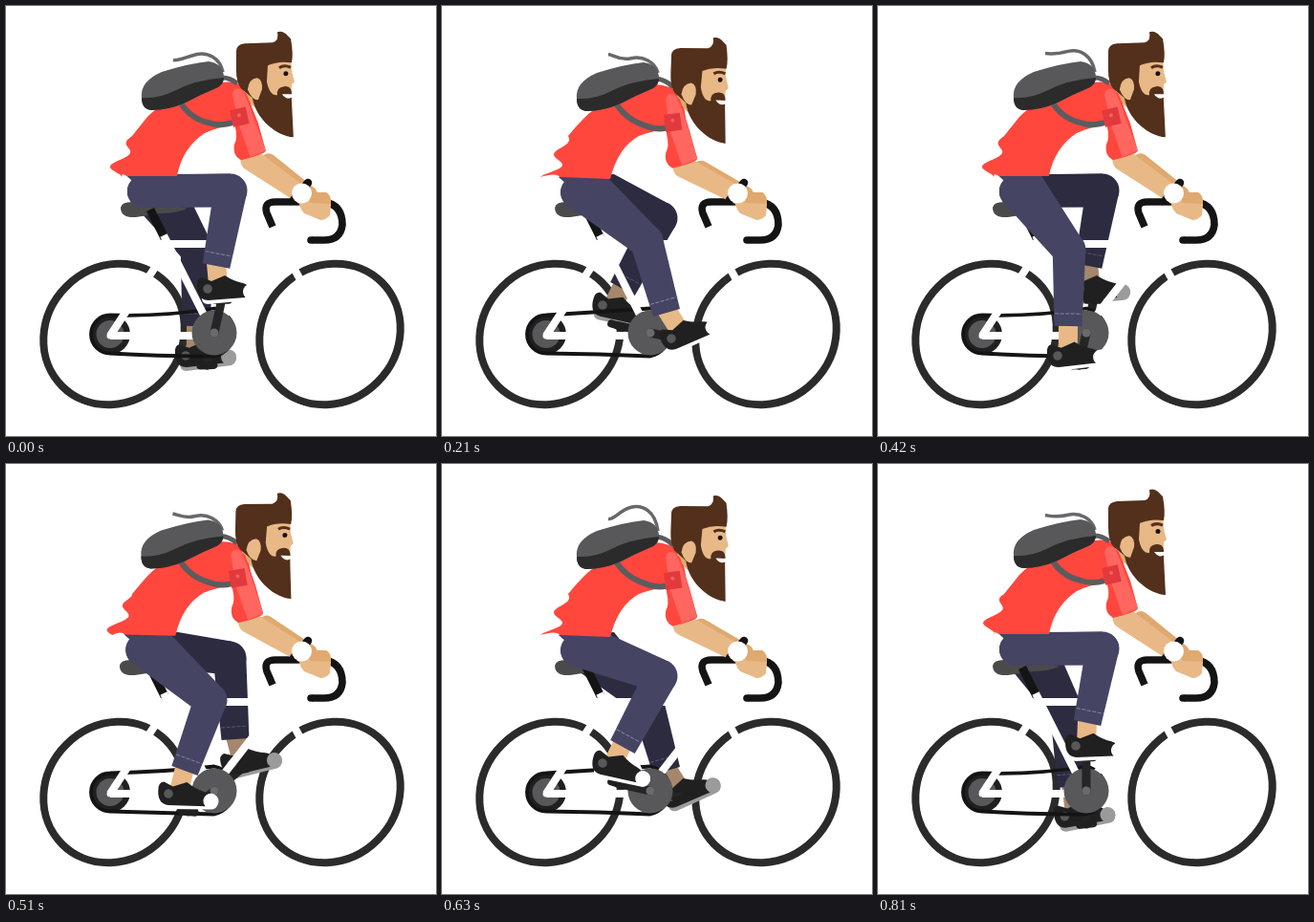
Write an HTML page with a canvas that moves like this. It is 450 px wide and 450 px high and loops after 840 ms.

```html
<!DOCTYPE html>
<html lang="en">
<head>
<meta charset="utf-8">
<title>Cyclist</title>
<style>
  html, body { margin: 0; width: 100%; height: 100%; overflow: hidden; background: #fff; }
  canvas { display: block; width: 450px; height: 450px; }
</style>
</head>
<body>
<canvas id="stage" width="450" height="450"></canvas>
<script>
const ctx = document.getElementById('stage').getContext('2d');
const LOOP = 840, STEP = 30, TAU = Math.PI * 2;
const C = {
  tyre: '#2b2b2b', black: '#141414', shoe: '#202020', white: '#fff', red: '#ff473e',
  band: '#ff6660', badge: '#e2393d', skin: '#e8b987', tan: '#dfa96f', hair: '#53301c',
  bag: '#2b2b2b', grey: '#58585a', strap: '#5c5c5e'
};
const NEAR = { cloth: '#454463', skin: C.skin, sole: C.white, seam: '#8584a0', waist: 170 };
const FAR = { cloth: '#2c2b40', skin: '#a5876c', sole: '#9b9b9b', seam: '#55546c', waist: 180 };
const BB = [218, 342], COG = [109, 343.5];

// time, knee x y, cuff x y, heel x y, foot angle
const PEDAL = [
  [0, 235, 193, 220, 272, 211, 296, 0],
  [90, 234, 203, 240, 288, 236, 314, -9],
  [120, 232, 211, 244, 296, 240, 321, -13],
  [210, 214, 246, 235, 321, 240, 348, -19],
  [330, 197, 262, 209, 339, 211, 368, -14],
  [420, 200, 255, 199, 335, 188, 366, -2],
  [510, 214, 247, 187, 321, 170, 345, 6],
  [630, 229, 222, 189, 296, 168, 313, 17],
  [750, 235, 197, 211, 275, 196, 297, 8],
  [810, 235, 193, 219, 271, 207, 295, 2]
];

function pose(t) {
  const n = PEDAL.length;
  const row = i => {
    const k = (i + n) % n, turn = Math.floor(i / n) * LOOP;
    return PEDAL[k].map((v, c) => c ? v : v + turn);
  };
  t = ((t % LOOP) + LOOP) % LOOP;
  let i = n - 1;
  while (PEDAL[i][0] > t) i--;
  const [a, b, c, d] = [-1, 0, 1, 2].map(k => row(i + k));
  const span = c[0] - b[0], s = (t - b[0]) / span;
  return b.slice(1).map((p, k) => {
    k++;
    const m0 = (c[k] - a[k]) / (c[0] - a[0]) * span;
    const m1 = (d[k] - b[k]) / (d[0] - b[0]) * span;
    return (2 * s ** 3 - 3 * s * s + 1) * p + (s ** 3 - 2 * s * s + s) * m0 +
      (3 * s * s - 2 * s ** 3) * c[k] + (s ** 3 - s * s) * m1;
  });
}

function fill(d, color) {
  ctx.fillStyle = color;
  ctx.fill(new Path2D(d));
}
function stroke(d, color, w, cap = 'butt') {
  ctx.strokeStyle = color;
  ctx.lineWidth = w;
  ctx.lineCap = cap;
  ctx.lineJoin = 'round';
  ctx.stroke(new Path2D(d));
}
function disc(x, y, r, color) {
  ctx.fillStyle = color;
  ctx.beginPath();
  ctx.arc(x, y, r, 0, TAU);
  ctx.fill();
}
function poly(color, ...pts) {
  fill('M' + pts.map(p => p.join(' ')).join('L') + 'Z', color);
}
function at(x, y, deg, draw) {
  ctx.save();
  ctx.translate(x, y);
  ctx.rotate(deg * Math.PI / 180);
  draw();
  ctx.restore();
}
// Tapered limb with round ends
function limb(x1, y1, r1, x2, y2, r2, color) {
  const a = Math.atan2(y2 - y1, x2 - x1);
  const o = Math.acos((r1 - r2) / Math.hypot(x2 - x1, y2 - y1));
  ctx.fillStyle = color;
  ctx.beginPath();
  ctx.arc(x1, y1, r1, a + o, a - o + TAU);
  ctx.arc(x2, y2, r2, a - o, a + o);
  ctx.fill();
}

// The wheels are slightly oval, leaning to the right
function wheel(x, y) {
  ctx.strokeStyle = C.tyre;
  ctx.lineWidth = 8;
  ctx.beginPath();
  ctx.ellipse(x, y, 76.8, 70.6, -Math.PI / 4, 0, TAU);
  ctx.stroke();
}

function crank(angle, foot) {
  const x = BB[0] + 35 * Math.sin(angle), y = BB[1] - 35 * Math.cos(angle);
  stroke(`M${BB[0]} ${BB[1]}L${x} ${y}`, '#252525', 9, 'round');
  at(x, y, foot, () => stroke('M-7 0H7', C.shoe, 8, 'round'));
}

function leg([kx, ky, cx, cy, hx, hy, tilt], b, k) {
  const hip = [144 - 3 * b, 194 + b];
  const d = Math.hypot(kx - hip[0], ky - hip[1]);
  const nx = (ky - hip[1]) / d, ny = (hip[0] - kx) / d;
  const rad = tilt * Math.PI / 180, co = Math.cos(rad), si = Math.sin(rad);
  const ax = hx + 11 * co + 5 * si, ay = hy + 11 * si - 5 * co;
  stroke(`M${cx} ${cy - 3}L${ax} ${ay}`, k.skin, 20);
  at(hx, hy, tilt, () => {
    fill('M-6 8L44-4Q53-3 53 4Q52 12 44 12L0 16Q-7 15-6 8Z', k.sole);
    fill('M-11-2Q-12-11-6-12L4-8L18-14Q27-8 37-6Q44-4 44 2L40 9L1 12Q-10 12-11-2Z', C.shoe);
    disc(45, 3, 8, k.sole);
    disc(0, 0, 4.8, C.grey);
  });
  limb(...hip, 17, kx, ky, 17.5, k.cloth);
  poly(k.cloth, [126 - 4 * b, 177 + 2 * b], [k.waist, 176], [kx + nx * 17.5, ky + ny * 17.5], [kx, ky], hip);
  const a = Math.atan2(cy - ky, cx - kx) * 180 / Math.PI - 90, len = Math.hypot(cx - kx, cy - ky);
  at(kx, ky, a, () => {
    poly(k.cloth, [-17.3, 0], [17.3, 0], [14.5, len], [-14.5, len]);
    ctx.setLineDash([4, 1.5]);
    stroke(`M-14 ${len - 13}H14`, k.seam, 1);
    ctx.setLineDash([]);
  });
}

function chain(b) {
  const sag = 3 * (1 - b);
  disc(...COG, 21, C.shoe);
  disc(...COG, 14.5, C.grey);
  stroke(`M109 323.5Q165 ${320 + sag * 1.8} ${BB[0]} 316.5A25.5 25.5 0 0 1 ${BB[0]} 366.5
    Q165 ${364 + sag} 109 363.5A20 20 0 0 1 109 323.5`, C.black, 3.8);
}

function bike(b) {
  at(-2 * b, 0, 0, () =>
    fill('M120 211Q121 205 132 205L166 206L190 212Q178 217 162 217L136 221Q120 222 120 211Z', '#4a4a4b'));
  stroke('M151 213L166 243', C.black, 9);
  stroke('M109 345L172 249H286M165 240L218 345M212 345L286 250M109 345H212M339 344L299 270', C.white, 8);
  disc(109, 345, 3.5, C.white);
  disc(...BB, 23.5, C.grey);
}

function shirt(b, u) {
  const tail = [];
  for (let i = 0; i <= 18; i++) {
    const s = i / 18;
    const w = Math.cos(TAU * ((s - .1) / .62 - u));
    tail.push(`${132 - 20 * s - 10 * Math.sqrt(s) * w} ${136 + 43 * s}`);
  }
  const x = -3 * b, y = 6 * b;
  fill(`M${254 + x} ${87 + y}Q${240 + x} ${76 + y} 222 ${81 + b}Q165 ${97 + 2 * b} 148 ${116 + 2 * b}
    Q140 126 132 136L${tail.join('L')}Q120 174 ${127 - 4 * b} ${178 + b}L${179 - 3 * b} ${178 + 3 * b}
    Q${185 - b} 148 ${208 - 2 * b} ${133 + 3 * b}Q222 ${126 + 4 * b} ${241 + x} ${124 + y}L${258 + x} ${112 + y}Z`, C.red);
}

function bag(b, t) {
  const flap = shift => Math.cos(TAU * (t - shift) / (LOOP / 3));
  const end = 53 + 5 * flap(35), mid = 49 - 5 * flap(85);
  stroke(`M${181 - b} ${98 + b}Q191 ${117 + b} 212 ${122 + 3 * b}Q224 ${126 + 4 * b} ${237 - 3 * b} ${122 + 6 * b}`, C.strap, 6);
  stroke(`M224 ${75 + b}Q234 ${74 + 3 * b} 242 ${81 + 4 * b}`, C.strap, 5);
  at(-b, b, 0, () => {
    stroke(`M227 69C224 ${mid + 4} 211 ${mid - 3} 199 ${mid}S181 ${end + 1} 175 ${end}`, '#68686a', 3.5);
    const base = 'Q228 81 222 85Q205 92 188 101Q170 109 152 109Q142 108 142 96';
    fill(`M142 96Q140 79 163 69Q192 60 212 58Q227 60 228 74${base}Z`, C.grey);
    fill(`M142 96Q160 97 176 89Q199 77 228 75${base}Z`, C.bag);
  });
}

function head(b) {
  at(270 - 1.5 * b, 60 + 6 * b, 2.2 * b, () => {
    ctx.translate(-270, -60);
    fill('M247 78L270 78L269 112Q256 104 249 92Z', C.tan);
    fill('M262 52H298L299 68L302 79L299 82V100H266Z', C.skin);
    fill(`M241 47Q241 40 250 39L279 38Q286 36 284 27Q290 25 295 31L298 34Q301 50 299 59
      Q285 57 274 62L273 79Q276 94 284 93Q283 85 291 84Q298 83 299 90L299 98L301 137
      C284 136 262 119 258 96L246 86Q241 80 241 66Z`, C.hair);
    fill('M253 87Q254 76 263 75Q269 77 268 87L264 98Q257 98 253 87Z', C.skin);
    fill('M289 92H300V95Q294 99 289 92Z', C.white);
    stroke('M286 64.5Q291 61 298 64', C.hair, 3);
    disc(293, 70.5, 2.5, '#1c1412');
  });
}

function arm(b) {
  const ex = 257 - 4 * b, ey = 161 + 8 * b;
  stroke('M279 231L273 217Q269 205 282 205H333Q352 208 352 229Q350 245 333 245H320', C.black, 7.6);
  disc(319, 245, 3.8, C.black);
  limb(ex + 18, ey + 1, 8, 318, 197, 8, C.tan);
  limb(ex, ey, 11.5, 311, 199, 9, C.skin);
  fill('M306 195L335 195Q341 198 340 208L339 219Q335 224 329 224L312 217Q305 210 306 195Z', C.skin);
  fill('M316 195L335 195Q340 198 340 207L318 206Z', C.tan);
  stroke('M301 203L316 185', C.black, 8.5, 'round');
  disc(309.5, 196, 10.5, C.white);

  const sx = -3 * b, sy = 6 * b, x = -5 * b, y = 9 * b;
  fill(`M${235 + sx} ${94 + sy}Q${242 + sx} ${82 + sy} ${252 + sx} ${92 + sy}L${264 + x} ${122 + y}
    L${272 + x} ${151 + y}Q${271 + x} ${155 + y} ${246 + x} ${161 + y}Q${237 + x} ${156 + y} ${239 + x} ${145 + y}
    Q${243 + x} ${138 + y} ${240 + x} ${126 + y}Z`, C.red);
  fill(`M${237 + sx} ${92 + sy}Q${239 + sx} ${84 + sy} ${246 + sx} ${87 + sy}Q${250 + sx} ${90 + sy} ${258 + sx} ${114 + sy}
    L${272 + x} ${151 + y}L${256 + x} ${158 + y}L${244 + x} ${124 + y}Z`, C.band);
  at(244.5 + sx, 116 + sy, -13 + 5 * b, () => {
    poly(C.badge, [-8.5, -9], [8.5, -9], [8.5, 9], [-8.5, 9]);
    disc(0, -2, 2, '#f4625f');
  });
}

function draw(t) {
  const u = t / (LOOP / 2) % 1;
  const b = .5 - .5 * Math.cos(TAU * (u + .06));
  const turn = TAU * t / LOOP + .22;
  const near = pose(t), far = pose(t + LOOP / 2);
  ctx.fillStyle = C.white;
  ctx.fillRect(0, 0, 450, 450);
  wheel(113, 343.5);
  wheel(339, 343.5);
  leg(far, b, FAR);
  crank(turn + Math.PI, far[6]);
  chain(b);
  bike(b);
  crank(turn, near[6]);
  disc(...BB, 4.5, '#6a6a6c');
  leg(near, b, NEAR);
  shirt(b, u);
  bag(b, t);
  head(b);
  arm(b);
}

const start = performance.now();
function tick() {
  const t = (performance.now() - start) % LOOP;
  draw(Math.floor(t / STEP) * STEP);
  requestAnimationFrame(tick);
}
tick();
</script>
</body>
</html>
```
